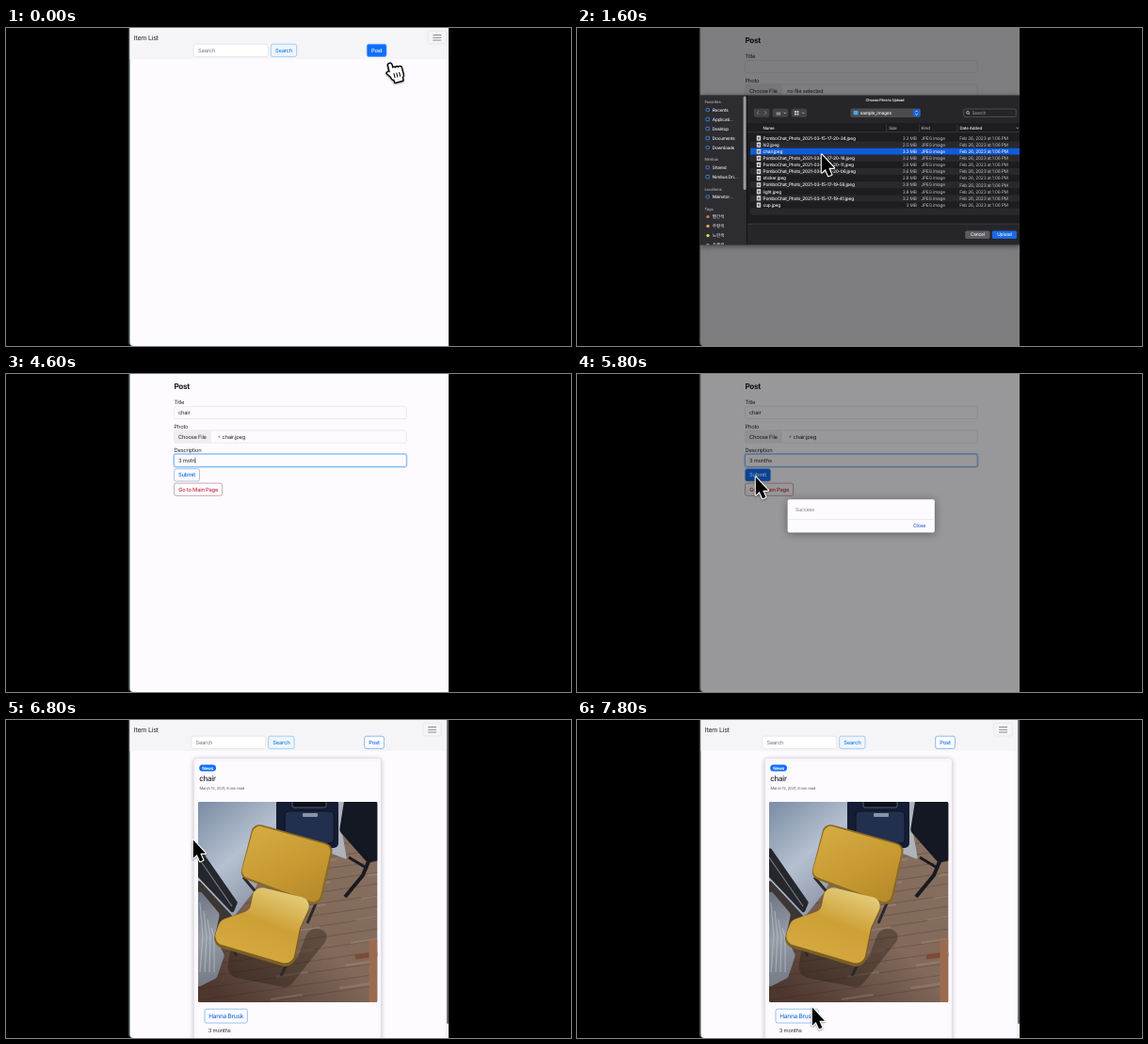
Animation, 600 px wide and 338 px high, one loop 8 s. Source, as an HTML page with a canvas:

```html
<!DOCTYPE html>
<html lang="en">
<head>
<meta charset="utf-8">
<title>Posting an item</title>
<style>
  html, body { margin: 0; width: 100%; height: 100%; overflow: hidden; background: #000; }
  canvas { display: block; width: 100vw; height: 100vh; }
</style>
</head>
<body>
<canvas id="stage"></canvas>
<script>
const W = 600, H = 338, LOOP = 8000, STEP = 200;
const LEFT = 131.5, RIGHT = 470;
const FONT = 'Inter, "Noto Sans CJK KR", "Noto Sans CJK", sans-serif';
const PAGE = '#fdfbff', BLUE = '#0d6efd', RED = '#c9303f', INK = '#2a2a2e';
const canvas = document.getElementById('stage');
const ctx = canvas.getContext('2d');

// ---------- helpers ----------
// Text is placed by its left, right or centre x and by the middle of its capitals.
function text(s, x, mid, size, color, weight = 400, align = 'left') {
  ctx.font = `${weight} ${size}px ${FONT}`;
  ctx.letterSpacing = -0.04 * size + 'px';
  ctx.textRendering = 'geometricPrecision';
  ctx.textAlign = align;
  ctx.fillStyle = color;
  ctx.fillText(s, x, mid + size * 0.364);
  return ctx.measureText(s).width;
}

function rect(x, y, w, h, color) {
  ctx.fillStyle = color;
  ctx.fillRect(x, y, w, h);
}

function box(x, y, w, h, r, fill, stroke, width = 0.6) {
  ctx.beginPath();
  ctx.roundRect(x, y, w, h, r);
  if (fill) { ctx.fillStyle = fill; ctx.fill(); }
  if (stroke) { ctx.strokeStyle = stroke; ctx.lineWidth = width; ctx.stroke(); }
}

function shadowed(blur, alpha, draw) {
  ctx.save();
  ctx.shadowColor = `rgba(0,0,0,${alpha})`;
  ctx.shadowBlur = blur;
  ctx.shadowOffsetY = 1;
  draw();
  ctx.restore();
}

function line(color, width, ...p) {
  ctx.beginPath();
  for (let i = 0; i < p.length; i += 2) ctx.lineTo(p[i], p[i + 1]);
  ctx.strokeStyle = color;
  ctx.lineWidth = width;
  ctx.stroke();
}

// Polygon whose corners are rounded by radius r.
function shape(fill, r, ...p) {
  const n = p.length;
  ctx.beginPath();
  ctx.moveTo((p[0] + p[n - 2]) / 2, (p[1] + p[n - 1]) / 2);
  for (let i = 0; i < n; i += 2) ctx.arcTo(p[i], p[i + 1], p[(i + 2) % n], p[(i + 3) % n], r);
  ctx.closePath();
  ctx.fillStyle = fill;
  ctx.fill();
}

function circle(x, y, r, fill, stroke) {
  box(x - r, y - r, 2 * r, 2 * r, r, fill, stroke, 0.7);
}

function chevron(x, y, dir, color) {
  line(color, 0.7, x - 1.2, y - 0.6 * dir, x, y + 0.6 * dir, x + 1.2, y - 0.6 * dir);
}

function gradient(x, y, x2, y2, ...colors) {
  const g = ctx.createLinearGradient(x, y, x2, y2);
  colors.forEach((c, i) => g.addColorStop(i / (colors.length - 1), c));
  return g;
}

function button(label, x, y, w, color, border, fill = PAGE, size = 5.8) {
  const h = size * 2.28;
  box(x, y, w, h, 2, fill, border, 0.7);
  text(label, x + w / 2, y + h / 2, size, fill === color ? '#fff' : color, 500, 'center');
}

// ---------- page ----------
function sheet(color) {
  box(LEFT, -10, RIGHT - LEFT, H + 10, [0, 0, 0, 4], color);
}

function page() {
  rect(0, 0, W, H, '#000');
  box(129.8, -10, 20, H + 10, [0, 0, 0, 4], '#3d4647');
  sheet(PAGE);
}

// With a scrollbar the centred parts move by half its width, the right part by all of it.
function header(bar, postFill) {
  const dx = -bar / 2;
  rect(LEFT, 0, RIGHT - LEFT, 33.3, '#f5f4f6');
  text('Item List', 135.8, 10, 7.1, INK);
  box(199.3 + dx, 17.2, 79, 13.3, 2, '#fff', '#dcdce1');
  text('Search', 204 + dx, 24, 5.8, '#73777d');
  button('Search', 281.3 + dx, 17.2, 27.3, '#2482e6', '#86bdeb', '#eef5fc');
  button('Post', 383.3 + dx, 17.2, 20.7, BLUE, '#5c9ff0', postFill);
  box(448 - bar, 3.2, 19.5, 13.8, 2, '#f5f4f6', '#dfdee2');
  for (let i = 0; i < 3; i++) rect(453.3 - bar, 7 + i * 2.8, 8.9, 0.8, '#6f6f73');
}

function floor() {
  rect(204, 87, 191, 213, gradient(385, 130, 235, 300, '#87705f', '#82695a', '#4d372f'));
  for (let i = 0; i < 14; i++) {
    const y = 140 + i * 12;
    line('rgba(50,32,25,.35)', 0.7, 204, y + 14, 395, y - 14);
    const x = 250 + (i * 67) % 140;
    line('rgba(205,180,160,.2)', 2.5, x, y + 1, x + 34, y - 4);
  }
}

function backdrop() {
  shape(gradient(204, 95, 285, 190, '#7f90a8', '#b5c0d0', '#8791a1'), 1,
    203, 86, 292, 86, 290, 130, 262, 184, 238, 214, 203, 240);
  shape('#aeb3bc', 1, 350, 86, 363, 86, 357, 120, 362, 148, 346, 142);

  // suitcase
  box(287, 84, 66, 52, 5, '#141d33');
  box(296, 97, 52, 34, 4, '#222f4e', '#0c1322', 1);
  box(304, 86, 36, 7, 2, '#0b101c', '#7e8ca2');
  box(315, 99, 16, 4, 1, '#8794a8');

  // office chair
  line('#191a20', 4, 388, 143, 379, 165, 360, 188);
  line('#191a20', 3, 364, 146, 384, 158);
  shape('#131823', 6, 360, 80, 400, 80, 400, 148, 384, 152, 354, 118);

  // leaning frame and the bag below it
  shape('#25272d', 2, 203, 132, 246, 194, 241, 206, 203, 166);
  line('#747b85', 1.2, 204, 146, 240, 198);
  shape('#3c3634', 2, 203, 168, 240, 208, 226, 245, 203, 285);
  shape(gradient(204, 185, 235, 275, '#6d7684', '#979da7', '#737a85'), 5,
    200, 174, 227, 206, 222, 230, 232, 250, 224, 274, 200, 286);
  for (let i = 0; i < 4; i++) line('rgba(205,212,222,.45)', 1.2, 206 + i * 4, 194 + i * 9, 209 + i * 4, 230, 206 + i * 5, 268);

  // wooden leg
  line('#7c4a35', 5, 371, 252, 395, 249);
  line('#9b6b50', 9, 390, 234, 390, 300);
}

function yellowChair() {
  const leg = (...p) => line('#2c2829', 3, ...p);
  shape('rgba(30,20,16,.35)', 12, 240, 232, 306, 262, 330, 200, 342, 232, 300, 285, 234, 272);
  leg(252, 167, 268, 186);
  leg(332, 188, 320, 216);
  leg(240, 240, 245, 251);
  leg(301, 254, 292, 272);
  shape('#8a6a25', 9, 263, 109, 348, 133, 334, 199, 248, 167);
  shape(gradient(275, 112, 315, 195, '#d4aa42', '#c99c33', '#b88b2b'), 8, 264, 111, 346, 134, 332, 196, 249, 165);
  shape('#7d5f22', 11, 263, 176, 327, 192, 313, 222, 305, 265, 218, 239, 227, 213, 258, 202);
  shape(gradient(292, 178, 262, 255, '#e4cd7c', '#cda035', '#d4a940'), 10,
    264, 176, 326, 191, 312, 221, 304, 261, 219, 236, 228, 213, 259, 202);
}

function photo() {
  ctx.save();
  ctx.beginPath();
  ctx.roundRect(204, 87, 190.3, 213, 1.5);
  ctx.clip();
  floor();
  backdrop();
  yellowChair();
  ctx.restore();
}

function itemCard() {
  shadowed(5, 0.22, () => box(199.4, 40.5, 199, 310, 3, PAGE, '#dddce0'));
  box(205.2, 47.6, 17.8, 7, 3.5, BLUE);
  text('News', 214.1, 51.1, 4.6, '#fff', 700, 'center');
  text('chair', 205.2, 62.3, 8, INK, 500);
  text('March 12, 2021, 6 min read', 205.4, 72.7, 4.1, '#5d5d62');
  photo();
  button('Hanna Brusk', 211, 307.2, 45.3, '#1a73e2', '#6fa8ee', PAGE, 6.5);
  text('3 months', 214.8, 329.9, 5.8, INK);
  rect(466.5, 0, 3.5, H, '#f3f2f5');
  box(468, -4, 2, 327, 1, '#6a6a6e');
}

// ---------- post form ----------
function field(label, y, value, focused, caret) {
  text(label, 178.6, y - 4.3, 5.8, INK);
  if (focused) box(178.5, y, 246.7, 13.3, 2, null, 'rgba(80,160,250,.4)', 2.4);
  box(178.5, y, 246.7, 13.3, 2, PAGE, focused ? '#64aaf0' : '#e4e2e8', 0.7);
  const w = text(value, 183, y + 6.7, 5.8, INK);
  if (focused && caret) rect(183 + w, y + 3.6, 0.6, 6.2, '#222');
}

function form(s) {
  text('Post', 178.4, 13.3, 8.2, '#1d1d20', 700);
  field('Title', 34.3, s.title, s.focus === 'title', s.caret);
  field('Photo', 59.9, '');
  box(178.5, 59.9, 39.5, 13.3, [2, 0, 0, 2], s.hover === 'file' ? '#dfdee2' : '#efedf1');
  text('Choose File', 183, 66.5, 5.8, INK);
  if (s.file) circle(226.4, 66.6, 1.1, '#a5a099');
  text(s.file ? 'chair.jpeg' : 'no file selected', s.file ? 229.6 : 223.2, 66.5, 5.8, INK);
  field('Description', 85.2, s.note, s.focus === 'note', s.caret);
  button('Submit', 178.6, 100.7, 26.9, BLUE, '#8aa9d6', s.hover === 'submit' ? BLUE : PAGE);
  button('Go to Main Page', 178.6, 116.1, 51, RED, '#b9868e', s.hover === 'main' ? RED : PAGE);
}

function modal() {
  sheet('rgba(0,0,0,.4)');
  shadowed(8, 0.4, () => box(223.6, 133.2, 156.2, 35.2, 2, PAGE));
  text('Success', 232, 144.2, 5.3, '#77777c');
  rect(223.6, 154, 156.2, 0.6, '#e2e1e5');
  text('Close', 370.2, 161.2, 5.3, '#2a62cf', 500, 'right');
}

// ---------- file picker ----------
const FILES = '20-34 hi2 chair 20-16 20-11 20-06 sticker 19-56 light 19-41 cup'.split(' ')
  .map(s => (/^\d/.test(s) ? 'PomboChat_Photo_2021-03-15-17-' + s : s) + '.jpeg');
const SIZES = '3.3 2.5 3.3 3.2 3.6 3.6 2.8 3.9 3.8 3.2 3'.split(' ');
const GROUPS = {
  Favorites: ['Recents', 'Applicati…', 'Desktop', 'Documents', 'Downloads'],
  Nimbus: ['Shared', 'Nimbus Dri…'],
  Locations: ['Mainstor…'],
  Tags: ['빨간색', '주황색', '노란색', '초록색']
};
const TAG_COLORS = ['#e8665c', '#eda64a', '#ecd058', '#68c466'];

function sidebar() {
  rect(130.6, 71.5, 50, 160, '#2d2c30');
  let y = 78.6;
  for (const [group, items] of Object.entries(GROUPS)) {
    text(group, 135.4, y, 4.2, '#a09fa4', 600);
    y += 8.4;
    items.forEach((name, i) => {
      if (group === 'Tags') circle(139, y, 1.7, TAG_COLORS[i]);
      else box(136.9, y - 1.7, 3.8, 3.4, i % 4 ? 0.6 : 1.7, null, '#3a8df2', 0.8);
      text(name, 143.8, y, 4.7, '#ececef', 500);
      y += 10;
    });
    y += 2.8;
  }
  box(176.6, 72.5, 3, 99.5, 1.5, '#99989c');
}

function toolbar() {
  const pale = '#dedee1';
  text('Choose Files to Upload', 327, 76.8, 4, '#f0f0f2', 600, 'center');
  for (let i = 0; i < 3; i++) {
    box(187.8 + i * 19.9, 85.7, 16.5, 9, 1.6, '#434247');
    if (i) chevron(201.3 + i * 19.5, 90.3, 1, pale);
    rect(211.6, 88 + i * 1.8, 4.6, 0.7, pale);
  }
  line('#99989d', 0.7, 193, 88.4, 191.2, 90.2, 193, 92);
  line('#99989d', 0.7, 199.3, 88.4, 201.1, 90.2, 199.3, 92);
  for (let i = 0; i < 4; i++) rect(231 + i % 2 * 2.6, 88.1 + (i >> 1) * 2.6, 1.8, 1.8, pale);
  box(290.4, 85.6, 74.6, 9.3, 1.8, '#4c4b50');
  box(293.6, 88, 5, 4.2, 0.7, '#45aaf0');
  text('sample_images', 300.8, 90.2, 4.8, '#f4f4f6', 500);
  box(357, 86.4, 7.2, 7.7, 1.4, '#1767de');
  chevron(360.6, 88.7, -1, '#fff');
  chevron(360.6, 91.8, 1, '#fff');
  box(410.6, 86, 55.6, 8.4, 1.6, '#252428', '#68676c');
  circle(415, 89.8, 1.4, null, pale);
  line(pale, 0.7, 416, 90.9, 417.2, 92.1);
  text('Search', 419.4, 90.2, 4.8, '#a5a4a9');
}

function fileList(selected) {
  const top = 113.5, pitch = 7.1;
  rect(180.3, 101, 290, 107, '#1d1c1f');
  ['Name', 'Size', 'Kind', 'Date Added'].forEach((name, i) => {
    const x = [197.6, 331.2, 365.6, 406.4][i];
    text(name, x, 106.2, 4.5, '#d6d6da', i % 3 ? 400 : 600);
    if (i) rect(x - 2.7, 102.5, 0.6, 7.5, '#4b4a4f');
  });
  chevron(467.8, 106.2, 1, '#d6d6da');
  for (const y of [110.5, 207.8]) rect(180.3, y, 290, 0.6, '#48474c');
  for (let i = 0; i < 13; i++) {
    const y = top + i * pitch, mid = y + pitch / 2, chosen = selected && i === 2;
    if (chosen) rect(184, y, 287, pitch, '#0f5cd8');
    else if (i % 2) box(184, y, 287, pitch, 1, '#29282c');
    if (!FILES[i]) continue;
    const soft = chosen ? '#fff' : '#bdbcc1';
    box(190.8, mid - 2.6, 4.4, 5.2, 0.4, '#e4e3e6');
    rect(191.7, mid - 1.2, 2.6, 2.6, '#77737a');
    text(FILES[i], 197.6, mid, 4.8, '#f2f2f4', 500);
    text(SIZES[i] + ' MB', 360.6, mid, 4.8, soft, 400, 'right');
    text('JPEG image', 365.4, mid, 4.8, soft);
    text('Feb 26, 2023 at 1:06 PM', 406.2, mid, 4.9, soft);
  }
}

function picker(selected) {
  sheet('rgba(0,0,0,.5)');
  shadowed(6, 0.5, () => rect(130.6, 71.5, 339.4, 159.1, '#262529'));
  ctx.save();
  ctx.beginPath();
  ctx.rect(130.6, 71.5, 339.4, 159.1);
  ctx.clip();
  sidebar();
  toolbar();
  fileList(selected);
  rect(180.2, 71.5, 0.7, 160, '#0b0b0c');
  ['Cancel', 'Upload'].forEach((label, i) => {
    const x = 412.2 + i * 28.6;
    box(x, 215.4, 26.2, 8.6, 1.8, i ? (selected ? '#1a69e6' : '#3a393e') : '#5d5c61');
    text(label, x + 13.1, 219.7, 4.9, '#f4f4f6', 500, 'center');
  });
  rect(130.6, 230, 339.4, 0.6, '#5a595e');
  ctx.restore();
}

// ---------- pointers ----------
function outlined(path, edge, width, fill) {
  ctx.lineJoin = 'round';
  ctx.lineWidth = width;
  ctx.strokeStyle = edge;
  shadowed(2, 0.4, () => ctx.stroke(path));
  ctx.fillStyle = fill;
  ctx.fill(path);
}

function arrow(x, y) {
  ctx.save();
  ctx.translate(x + 0.8, y + 0.5);
  outlined(new Path2D('M0 0V19.2L4 15.6L7.2 22.8L10.6 21.4L7.5 14.3H13.2Z'), '#fff', 2.2, '#000');
  ctx.restore();
}

function hand(x, y) {
  const path = new Path2D('M-5 9.5L-3 8.5L1 12V18Z');
  path.roundRect(-1.5, 0.5, 3.4, 16, 1.7);
  for (let i = 1; i < 4; i++) path.roundRect(-1.5 + i * 3.1, 5 + i * 0.4, 3.4, 10, 1.7);
  path.roundRect(-1.5, 9, 12.7, 9, 3);
  path.rect(1, 16, 8.5, 5);
  ctx.save();
  ctx.translate(x, y);
  ctx.rotate(-0.25);
  outlined(path, '#000', 2.8, '#fff');
  for (let i = 0; i < 3; i++) rect(1.6 + i * 2.9, 11.5, 1, 5, '#000');
  ctx.restore();
}

// ---------- timeline ----------
// Places the pointer rests at, with the times it arrives and leaves.
const STOPS = [
  { from: 200, to: 200, x: 400, y: 42 },
  { from: 600, to: 1000, x: 200, y: 64 },
  { from: 1200, to: 1600, x: 259, y: 134 },
  { from: 2000, to: 2200, x: 452, y: 217 },
  { from: 2400, to: 2600, x: 262, y: 42 },
  { from: 5400, to: 5800, x: 189, y: 109 },
  { from: 6000, to: 6200, x: 362, y: 158 },
  { from: 6400, to: 7200, x: 198, y: 127 },
  { from: 7800, to: LOOP, x: 249, y: 305 }
];

function pointerAt(t) {
  const i = STOPS.findIndex(s => t <= s.to), b = STOPS[i], a = STOPS[i - 1] || b;
  const k = t >= b.from ? 1 : (t - a.to) / (b.from - a.to);
  return [a.x + (b.x - a.x) * k, a.y + (b.y - a.y) * k];
}

const during = (t, from, to) => t >= from && t < to;

// One or more characters per step, starting with `first` of them.
function typed(s, t, start, first, rate = 1) {
  return t < start ? '' : s.slice(0, first + rate * (t - start) / STEP);
}

function draw(t) {
  page();
  if (t < 200) {
    header(0, BLUE);
    hand(407, 37.6);
    return;
  }
  if (t >= 6600) {
    header(5.2, PAGE);
    itemCard();
  } else {
    form({
      title: typed('chair', t, 2800, 1),
      note: t < 4800 ? typed('3 motn', t, 3800, 2) : typed('3 months', t, 4800, 4, 2),
      file: t >= 2200,
      focus: during(t, 2400, 3600) ? 'title' : during(t, 3600, 6200) ? 'note' : '',
      caret: t < 5400,
      hover: during(t, 600, 1000) ? 'file' : during(t, 5400, 6000) ? 'submit' : t === 6400 ? 'main' : ''
    });
    if (during(t, 1000, 2200)) picker(t >= 1200);
    if (during(t, 5800, 6200)) modal();
  }
  if (!during(t, 2600, 5400)) arrow(...pointerAt(t));
}

function tick() {
  const ratio = window.devicePixelRatio || 1;
  const w = Math.round(innerWidth * ratio), h = Math.round(innerHeight * ratio);
  if (canvas.width !== w || canvas.height !== h) {
    canvas.width = w;
    canvas.height = h;
  }
  ctx.setTransform(w / W, 0, 0, h / H, 0, 0);
  const t = performance.now() % LOOP;
  draw(Math.floor(t / STEP) * STEP);
  requestAnimationFrame(tick);
}
tick();
</script>
</body>
</html>
```
